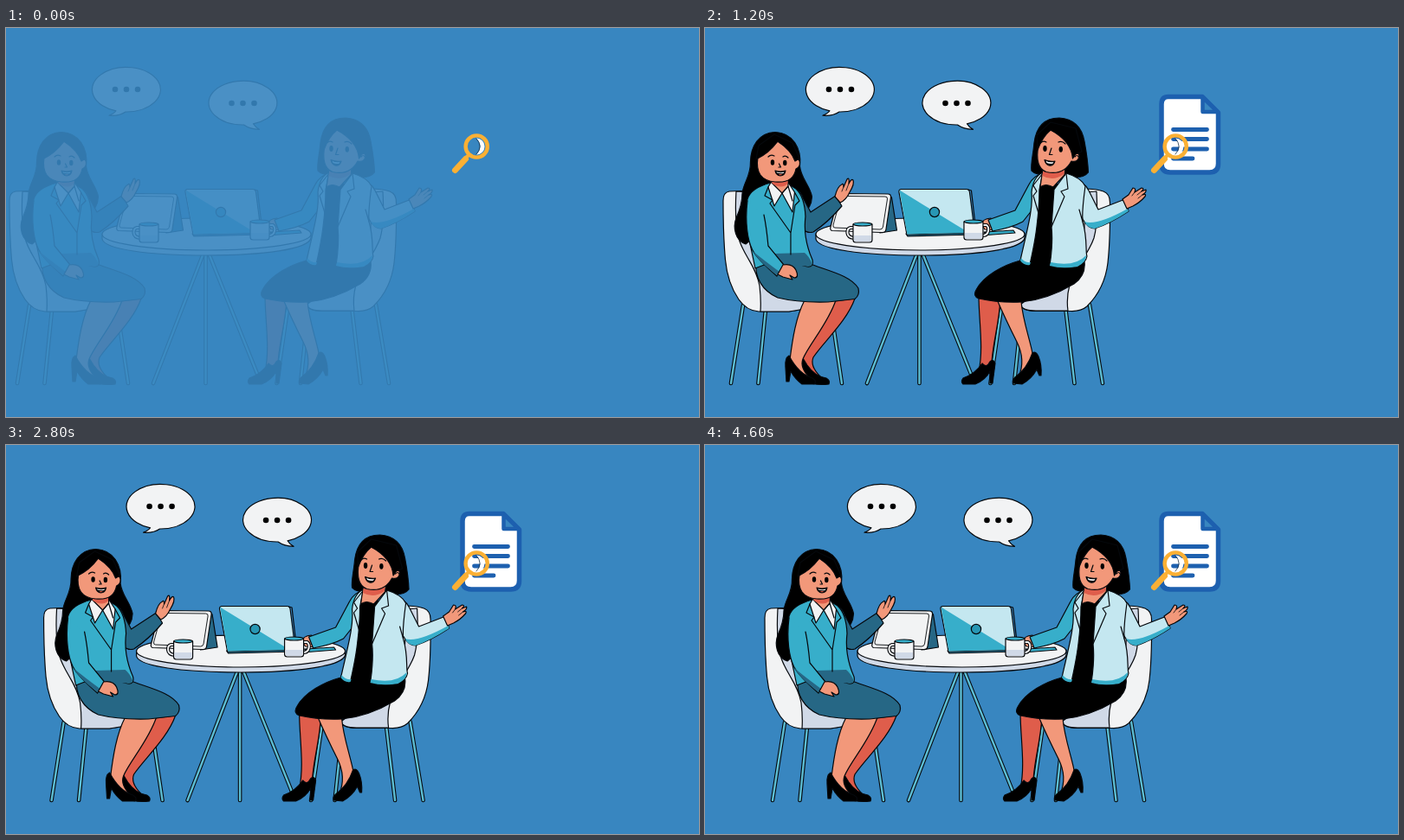
Write an HTML page that moves like this. It is 800 px wide and 450 px high and loops after 4700 ms.

```html
<!DOCTYPE html>
<html lang="en">
<head>
<meta charset="utf-8">
<title>Meeting</title>
<style>
html, body { margin: 0; width: 100%; height: 100%; overflow: hidden; background: #3886c0; }
svg { display: block; width: 800px; height: 450px; }
#scene { stroke: #05080c; stroke-width: 1.2; stroke-linejoin: round; stroke-linecap: round; }
.white { fill: #f2f3f4; }
.shade { fill: #d0d9e7; }
.teal { fill: #37aeca; }
.deep { fill: #266785; }
.pale { fill: #c4e7f0; }
.skin { fill: #f2987a; }
.dim { fill: #df5d4b; }
.ink { fill: #000; }
.line { fill: none; }
.flat { stroke: none; }
.tube { fill: none; stroke-width: 4.6; }
.core { fill: none; stroke: #5cbdd3; stroke-width: 2.4; }
</style>
</head>
<body>
<svg viewBox="0 0 800 450">
<defs>
  <path id="chairLegs" d="M92 321L78 411M118 326L109.500 411M195.500 340L206 411M492 320L507 411M464.500 326L474.500 411M390 325L377.500 411M412 345L405 411"/>
  <path id="tableLegs" d="M292 263L235 411M300 263L357 405M295.500 262V411"/>
  <g id="dots" class="ink flat"><circle cx="-13" r="3.3"/><circle r="3.3"/><circle cx="13" r="3.3"/></g>
  <g id="cup">
    <path class="white" d="M-11-10V8Q-11 11-8 11H8Q11 11 11 8V-10Z"/>
    <path class="shade flat" d="M-10 3H10V8Q10 10 8 10H-8Q-10 10-10 8Z"/>
    <ellipse class="teal" cy="-10" rx="10.800" ry="2"/>
  </g>
</defs>

<g id="scene">
  <!-- speech bubbles -->
  <path class="white" d="M192 95.800Q190 99 184 101.200Q196 102 203 97A39.500 25.800 0 1 0 192 95.800Z"/>
  <use href="#dots" x="204" y="71"/>
  <path class="white" d="M339.500 112Q346.500 117 357.500 117.300Q352.500 114.500 350.500 110.800A39.500 25.400 0 1 0 339.500 112Z"/>
  <use href="#dots" x="338.500" y="87"/>

  <!-- chairs -->
  <use href="#chairLegs" class="tube"/><use href="#chairLegs" class="core"/>
  <path class="white" d="M100 188L76 189Q69 190 69 200Q69 240 71.500 268Q74 295 87 314Q96 327 110 328H145Q172 325 180 313L150 270L118 205Z"/>
  <path class="shade" d="M84 189Q82 225 87 243C91 261 107 275 111 298Q113 315 112 328H145Q172 325 180 313L110 270L100 190Z"/>
  <path class="white" d="M486 186Q500 186 508 189Q516 192 515.500 203Q516 245 513 272C510 297 498 313 489 322Q482 328 470 327.500H430Q414 327 412 320L470 260Z"/>
  <path class="shade" d="M488 190L500 189Q502 225 497 243C490 264 472 280 469 297Q465 312 467 327H430Q414 327 412 320L484 268Z"/>

  <!-- table -->
  <use href="#tableLegs" class="tube"/><use href="#tableLegs" class="core"/>
  <path class="shade" d="M176 238V244C178 256 230 263 296 263S414 256 417 243V237Z"/>
  <ellipse class="white" cx="296.500" cy="238.500" rx="120.500" ry="18.500"/>
  <path class="deep" d="M260 193L263.500 196L269.500 234L250 237Z"/>
  <path class="white" d="M206 191.500L259 192Q263 192 262.500 196L257 233Q256.500 237 252 236.500L195 234.500Q192 234 193 230L202 195Q203 192 206 191.500Z"/>
  <path class="line" stroke-width=".9" d="M207 194.500L256 195Q259 195 258.500 198L253.500 230Q253 233 250 233L198 231Q195.500 231 196 228L204.500 197Q205 194.500 207 194.500Z"/>
  <path class="deep" d="M280 238L361 236V239L282 241Z"/>
  <path class="pale" d="M274 186.500H350Q353 186.500 353.500 190L359.500 237L281 239L272 190Q271.500 187 274 186.500Z"/>
  <path class="teal flat" d="M272.500 187.500L353 237L281.500 238.500Z"/>
  <path class="line" d="M352 187L355.500 188L361 236"/>
  <circle cx="313" cy="213" r="5.600" fill="#2897b4"/>
  <path class="teal" d="M370 236L404 234L406 237L374 239.500Z"/>
  <path class="line" stroke-width="4.200" d="M220 231H216Q212 232 212.500 237Q213 242 220 243"/>
  <path class="line" stroke="#f2f3f4" stroke-width="2" d="M220 231H216Q212 232 212.500 237Q213 242 220 243"/>
  <use href="#cup" x="230" y="237"/>

  <!-- woman on the left -->
  <path class="ink" d="M129 120.500C110 121 101 137 100.500 155C101 172 92 179 91 192C91 203 88 211 84 220C80 231 83 246 95 250L125 225L160 215Q171 209 171.500 195C169 182 159 174 157.500 160C160 139 149 121 129 120.500Z"/>
  <path class="dim" d="M190 317L221 313C212 339 185 363 173 381Q169 391 181 403L171 406L158 386Q164 360 190 317Z"/>
  <path class="ink" d="M158 377Q157 392 161 398L163 408Q174 414 191 412Q193 408 188 405Q175 403 166 390Z"/>
  <path class="skin" d="M163 315H199C190 342 168 366 161 383Q157 393 170 406L157 405L146 384C149 360 153 334 163 315Z"/>
  <path class="ink" d="M145 379Q140 382 141 392L142 409H145L147 397Q152 406 160 412H174Q178 409 172 405Q156 400 145 379Z"/>
  <path class="deep" d="M107 271C105 288 114 304 132 312Q156 318 190 317L221 313.500Q227 309 225 301C216 286 190 281 167 272Z"/>
  <path class="deep" d="M148 184Q158 186 162 198L170 213L199 194L206 206Q190 225 173 236Q166 238 160 232Z"/>
  <path class="skin" d="M198 195Q201 183 206 181Q208 179 208 184L212 175Q215 172 214 180Q217 174 219 176Q221 180 215 190Q211 199 204 202Z"/>
  <path class="line" stroke-width=".8" d="M208 184L206 189M214 180L211 188"/>
  <path class="teal" d="M124 179Q101 185 97 198Q94 219 98 240L106 278L132 268L166 276Q174 277 172 268C164 250 162 235 164 218Q163 195 153 186L145 181Z"/>
  <path class="deep flat" d="M128 261L163 260Q168 264 171.500 272Q171 276 166 275.500L132 274Z"/>
  <path class="teal" d="M97 200C94 224 97 246 103 257Q108 267 131 287L139 274L121 252Q119 230 116 216"/>
  <path class="deep flat" d="M103 258Q110 270 131 286L134 282Q115 268 103 258Z"/>
  <path class="skin" d="M138 274Q149 272 153 280Q157 289 151 289L146 286L149 291L138 288L132 285Z"/>
  <path class="white" d="M125 177L121 184L128 206L137 191L149 213L151.500 190L145 180Z"/>
  <path class="line" d="M121 184L117 194L126 199L123 203L147 237V262M151.500 190L157 200L152 205L147 237M137 191L144 183L149 200"/>
  <path class="skin" d="M125 172V179L137 191L144 183V174Z"/>
  <path class="dim flat" d="M125.500 174V180Q137 187 143.500 180V174Z"/>
  <path class="skin" d="M109 150Q105 176 129 178Q150 180 153 163Q158 161 157.500 155Q156 150 152.500 153C151 142 142 138 132 131C125 138 115 144 109 150Z"/>
  <path class="ink" d="M132 131Q122 145 107 152L110 136L128 123L149 133L157 151L152 154Q148 142 132 131Z"/>
  <g class="ink flat"><ellipse cx="126" cy="155.500" rx="2.200" ry="3.300"/><ellipse cx="140.300" cy="156" rx="2.200" ry="3.300"/></g>
  <path class="line" d="M121 149Q124 146 128 148M138 149Q141 147 144 150M133.500 157L135.500 161H133"/>
  <path class="ink" d="M129 165Q135 167 141 165Q140 171 135 171Q130 170.500 129 165Z"/>
  <path class="white flat" d="M130.500 166.200Q135 168 139.500 166.400L139 167.800Q135 169 131 167.500Z"/>
  <path class="dim flat" d="M132.500 169.500Q135 168.500 137.500 169.500Q135 171 132.500 169.500Z"/>

  <!-- woman on the right -->
  <path class="ink" d="M457 104C438 104 430 117 428 133C427 146 424 156 425 165Q430 170 440 169.500L474 173Q486 173 490.500 167C490 153 488 142 486 131C483 114 473 105 457 104Z"/>
  <path class="dim" d="M364 309L389 313C388 341 379 369 379 390L370 402L364 398C370 370 364 338 364 309Z"/>
  <path class="ink" d="M368 388Q360 400 346 405Q343 409 346 412H360Q372 407 377 397V411H380L383 388Q381 382 377 386Q373 394 368 388Z"/>
  <path class="skin" d="M385 314L413 316C415 340 424 362 427 381L418 400L410 404C416 390 415 377 408 363Q395 337 385 314Z"/>
  <path class="ink" d="M426 376Q420 394 406 404Q402 408 404 411L414 412Q425 406 431 395L434 402H436Q437 390 433 380Q430 373 426 376Z"/>
  <path class="pale" d="M470 173Q486 177 491 188L502 210L533 198L537 212Q516 226 498 232Q490 232 484 221Z"/>
  <path class="teal flat" d="M536 209L537 212Q516 226 498 232Q490 232 486 224Q500 229 536 209Z"/>
  <path class="skin" d="M530 198L537 193L542 185Q546 185 544 190L552 185Q556 185 552 189L557 187Q558 190 553 193Q558 191 556 195Q550 202 542 206L535 209Z"/>
  <path class="line" stroke-width=".8" d="M544 190L541 194M552 189L547 193M553 193L548 197"/>
  <path class="skin" d="M378 220Q368 221 367 227L371 233L382 234Z"/>
  <path class="teal" d="M438 168Q427 171 422 181L406 211L375 222L380 235Q402 231 415 224L430 205Z"/>
  <path class="ink" d="M434 178L444 176L456 181L448 230L448 274L486 270Q488 286 474 296Q444 314 413 317Q386 318 364 313Q357 310 361 303C370 286 393 274 412 269L428 225Z"/>
  <path class="pale" d="M438 167Q427 172 425 190C427 209 420 233 412 269Q416 275 423 274Q429 247 431 230Q434 206 434 187Z"/>
  <path class="pale" d="M465 168Q482 173 487 183Q483 212 484 224C490 244 487 260 489 264Q488 271 478 276Q460 279 446 275Q450 248 448 230L451 187Z"/>
  <path class="teal flat" d="M413 266L412 269Q416 275 423 274L424 271Q417 272 413 266ZM447 271Q475 277 488 263Q489 270 478 276Q460 279 446 275Z"/>
  <path class="line" d="M438 168L427 182L431 189L427 194L433 214M465 168L467 186L459 189L463 195L448 230M484 224L480 210"/>
  <path class="skin" d="M438 163L435 184Q441 179 450 184L463 170L464 162Z"/>
  <path class="dim flat" d="M438.500 165L437.500 171Q450 178 462.500 169V163Z"/>
  <path class="skin" d="M433 135C430 152 432 163 442 166.500Q462 171 471 154Q479 156 480 148Q479 143 475 145C474 133 462 124 447 118Q437 124 433 135Z"/>
  <path class="ink" d="M447 118C441 123 436 130 432 141L431 124L447 109L476 116L483 143L476 146L472.500 151Q471 131 447 118Z"/>
  <g class="ink flat"><ellipse cx="440.500" cy="139.500" rx="2.200" ry="3.400"/><ellipse cx="458.800" cy="140.300" rx="2.200" ry="3.400"/></g>
  <path class="line" d="M435.500 133Q438 130 442 132M456 132Q460 130 464 134M448 139L445.500 146.500H449M475 149Q478 146 479 149"/>
  <path class="ink" d="M440 152.500Q446 155 452 154Q450 160 445 159Q441 157.500 440 152.500Z"/>
  <path class="white flat" d="M441.500 153.800Q446 156 450.500 155L449.500 156.700Q446 157.500 442.500 156Z"/>

  <path class="line" stroke-width="4.200" d="M369 228H373Q376 230 375 235Q374 240 368 240"/>
  <path class="line" stroke="#f2f3f4" stroke-width="2" d="M369 228H373Q376 230 375 235Q374 240 368 240"/>
  <use href="#cup" x="358" y="234"/>
</g>

<g id="doc" fill="none" stroke="#1d60af" stroke-width="5.500" stroke-linecap="round" stroke-linejoin="round">
  <path fill="#fff" d="M535 79.500H574L592.500 98V157Q592.500 167 582.500 167H537Q527 167 527 157V88Q527 79.500 535 79.500Z"/>
  <path fill="#3886c0" stroke-width="4.500" d="M574.500 80.500V97H591.500Z"/>
  <path stroke-width="4.800" d="M540.500 117.500H579.500M540.500 128.500H579.500M540.500 140H579.500M540.500 151H563"/>
</g>

<g fill="none" stroke="#fbb034" stroke-linecap="round">
  <path stroke-width="4" d="M534 147L530 151"/>
  <path stroke-width="7" d="M530.500 151.500L518.500 164.500"/>
  <path fill="#fff" stroke="none" d="M543 127.500A9.500 9.500 0 0 1 543 146.500Q552 137 543 127.500Z"/>
  <path stroke="#1c3348" stroke-width=".8" d="M543 128Q551.500 137 543 146"/>
  <circle cx="543.200" cy="137" r="12.600" stroke-width="4.400"/>
</g>
</svg>
<script>
const LOOP = 4700, STEP = 100;
const scene = document.getElementById('scene');
const doc = document.getElementById('doc');
const clamp = v => Math.max(0, Math.min(1, v));

function place(node, x, opacity) {
  node.setAttribute('transform', `translate(${x.toFixed(2)} 0)`);
  node.setAttribute('opacity', clamp(opacity));
}

function draw(now) {
  const t = Math.floor(now % LOOP / STEP) * STEP;
  // steady drift to the right, with a short fade-in
  place(scene, (t - 4600) * 65 / 4600, 0.1 + t / 520);
  // the page eases in from the left
  place(doc, -60 * (1 - clamp(t / 650)) ** 2, t / 550);
}

let start;
function tick(now) {
  start ??= now;
  draw(now - start);
  requestAnimationFrame(tick);
}
draw(0);
requestAnimationFrame(tick);
</script>
</body>
</html>
```
